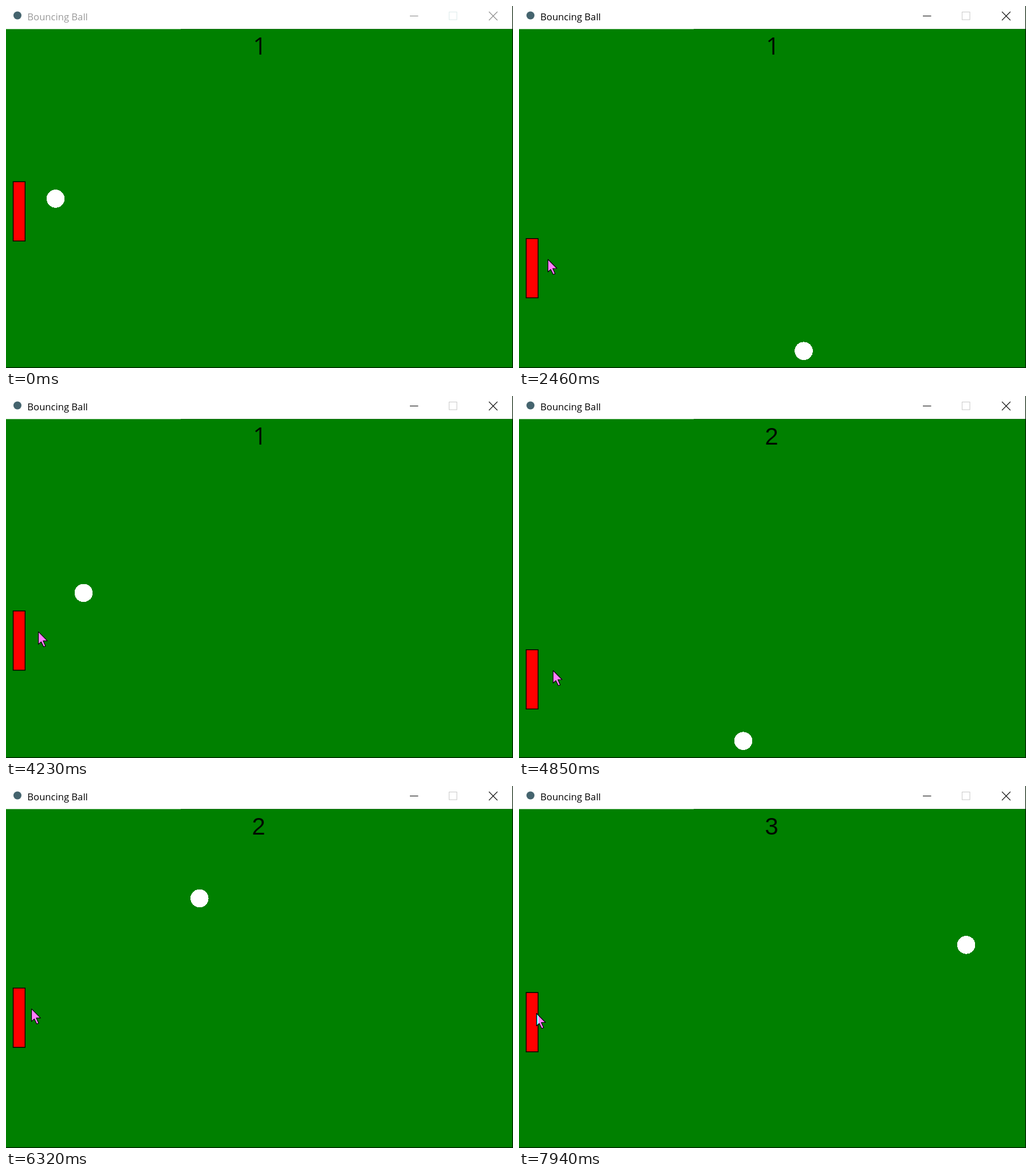
Animation, 885 px wide and 633 px high, one loop 8 s. Source, as an HTML page:

```html
<!DOCTYPE html>
<html lang="en">
<head>
<meta charset="utf-8">
<title>Bouncing Ball</title>
<style>
  html, body { margin: 0; width: 100%; height: 100%; overflow: hidden; background: #fff; }
  svg { display: block; width: 885px; height: 633px; isolation: isolate; }
  .title { font: 16.65px "Open Sans", "Noto Sans", sans-serif; fill: #999; }
  .score { font: 42px "Liberation Sans", sans-serif; text-anchor: middle; fill: #000b00; }
  .score.one { font-family: "Open Sans", sans-serif; transform: translateX(2px); }
  .btn { fill: none; stroke: #8c8c8c; stroke-width: 1.1; }
  .max { stroke: #dfecec; }
  .active .title { fill: #000; }
  .active .btn { stroke: #111; }
  .active .max { stroke: #ccc; }
  .invert { fill: #fff; mix-blend-mode: difference; }
  .edge { fill: none; stroke: #000; stroke-width: 1.2; stroke-linejoin: round; }
</style>
</head>
<body>
<svg id="stage" viewBox="0 0 885 633">
  <rect width="885" height="633" fill="#fff"/>
  <circle cx="20" cy="16.5" r="7" fill="#45646e"/>
  <text class="title" x="37.3" y="24.6">Bouncing Ball</text>
  <path class="btn" d="M705 17.5h14.5"/>
  <rect class="btn max" x="773.5" y="10.5" width="13.5" height="13.5"/>
  <path class="btn" d="M843 10l14.8 15m0-15l-14.8 15"/>
  <rect y="40" width="885" height="593" fill="#008000"/>
  <path d="M0 40.5H305" stroke="#60b060"/>
  <path d="M305 40.5H885" stroke="#1a6e1a"/>
  <path d="M0 632.3H884.5V0" fill="none" stroke="#001800" stroke-width="1.3"/>
  <text id="score" class="score" x="441" y="85">1</text>
  <rect id="paddle" x="12.5" width="20.8" height="103.6" fill="#f00" stroke="#000" stroke-width="1.5"/>
  <circle id="ball" r="15.8" fill="#fff" shape-rendering="crispEdges"/>
  <g id="cursor">
    <path class="invert" d="M0 0V23.5L5.2 18.8 9.6 28 13.2 26.4 9.2 17.2H17z"/>
    <path class="edge" d="M0.5 1V23L5.3 18.7 9.7 27.5 13 26.1 9 17H16.3z"/>
  </g>
</svg>
<script>
const $ = id => document.getElementById(id);
const LOOP = 8000;
const FOCUS = 1680;    // the window is clicked
const START = 1810.5;  // the game resumes
const RATE = 65;       // game moves per second
const GRIP = 35.6;     // paddle top to cursor tip

// Turning points of the hand: time, x, y
const hand = [
  [70, 625, 612], [820, 18, 388], [1210, 18, 360], [1760, 23, 360],
  [2460, 50, 442], [3540, 62, 487], [4250, 56, 411], [4850, 59, 479],
  [5550, 47, 414], [6700, 43, 380], [7540, 40, 525], [7940, 30, 396.5]
];

function cursorAt(t) {
  const i = Math.max(1, hand.findIndex(h => h[0] >= t));
  const [t0, x0, y0] = hand[i - 1], [t1, x1, y1] = hand[t > 7940 ? hand.length - 1 : i];
  const p = t > 7940 ? 1 : Math.max(0, (t - t0) / (t1 - t0));
  const e = p * p * (3 - 2 * p);
  return { x: x0 + (x1 - x0) * e, y: y0 + (y1 - y0) * e };
}

// The game on its 600 x 400 field; each paddle hit adds 10% speed
function play(n) {
  let x = 58.6, y = 201, vx = 6.625, vy = 5, score = 1;
  while (n-- > 0) {
    x += vx;
    y += vy;
    if (y >= 396 || y <= 6) vy = -vy;
    if (x >= 592) vx = -vx;
    if (x <= 34) { vx *= -1.1; score++; }
  }
  return { x: 1.475 * x + 0.2, y: 39.7 + 1.479 * y, score };
}

function draw() {
  const t = performance.now() % LOOP;
  const ball = play(Math.round((t - START) * RATE / 1000));
  const tip = cursorAt(t);
  $("stage").classList.toggle("active", t >= FOCUS);
  $("score").textContent = ball.score;
  $("score").classList.toggle("one", ball.score === 1);
  $("ball").setAttribute("cx", ball.x);
  $("ball").setAttribute("cy", ball.y);
  $("paddle").setAttribute("y", t < START ? 307.3 : tip.y - GRIP + 0.3);
  $("cursor").setAttribute("visibility", t < 70 ? "hidden" : "visible");
  for (const part of $("cursor").children) {
    part.setAttribute("transform", `translate(${tip.x} ${tip.y})`);
  }
  requestAnimationFrame(draw);
}
draw();
</script>
</body>
</html>
```
